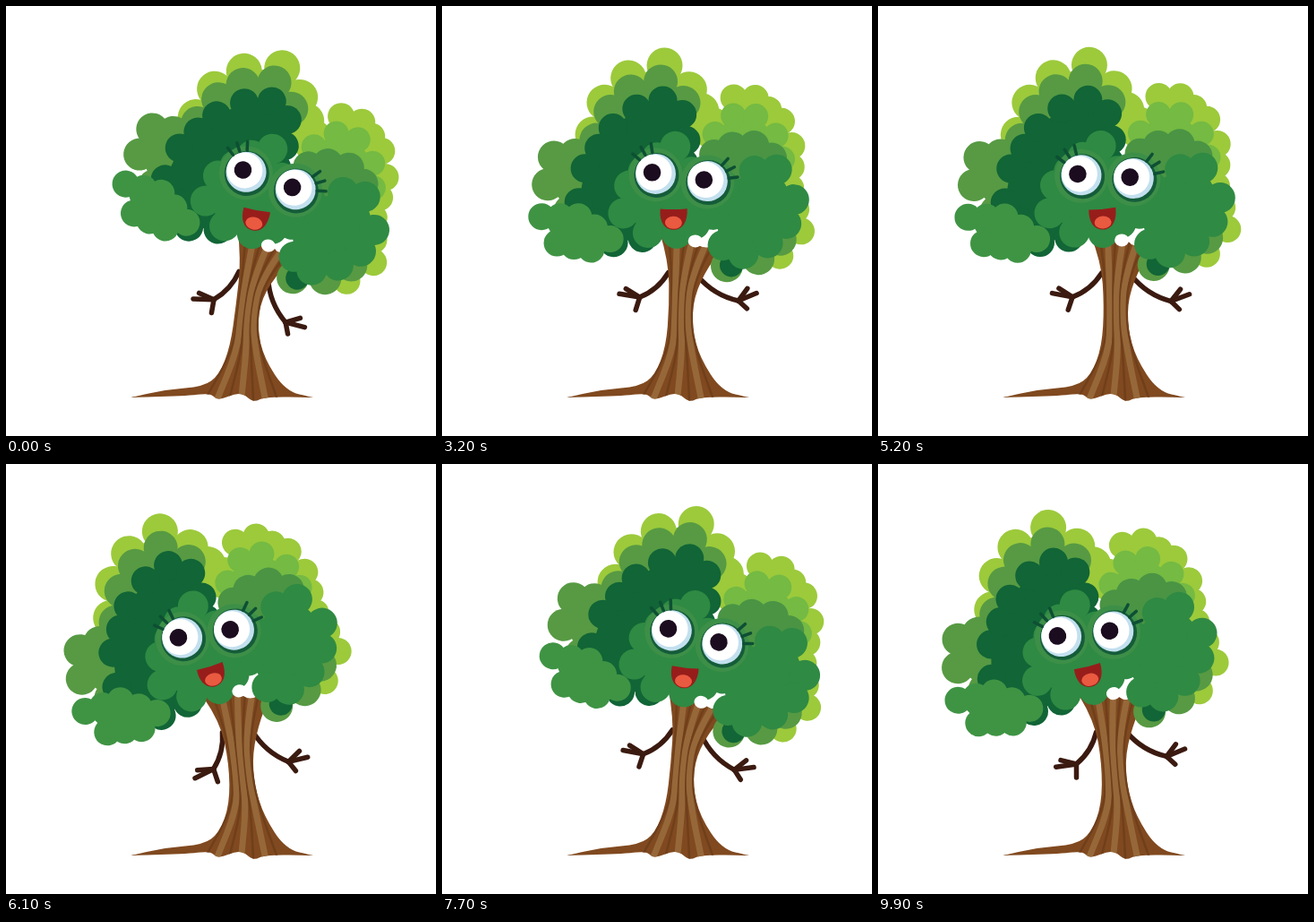
These frames come from a looping animation (480 by 480 pixels, 10000 ms). An HTML page with a canvas:

```html
<!DOCTYPE html>
<html lang="en">
<head>
<meta charset="utf-8">
<title>Swaying tree</title>
<style>
html, body { margin: 0; width: 100%; height: 100%; overflow: hidden; background: #fff; }
canvas { display: block; }
</style>
</head>
<body>
<canvas id="stage" width="480" height="480"></canvas>
<script>
const c = document.getElementById('stage').getContext('2d');
const RAD = Math.PI / 180;
// Times in seconds when the sway turns round, starting at the far right
const TURNS = [0.2, 2.15, 4.05, 6.15, 8.3, 10.35];

function circle(x, y, r, fill) {
  c.fillStyle = fill;
  c.beginPath();
  c.arc(x, y, r, 0, 7);
  c.fill();
}

function ellipse(x, y, rx, ry, fill) {
  c.fillStyle = fill;
  c.beginPath();
  c.ellipse(x, y, rx, ry, 0, 0, 7);
  c.fill();
}

function line(color, width, from, to, via = from) {
  c.strokeStyle = color;
  c.lineWidth = width;
  c.beginPath();
  c.moveTo(...from);
  c.quadraticCurveTo(...via, ...to);
  c.stroke();
}

// Point at a distance from [x, y] in a direction given in degrees
const polar = ([x, y], deg, len) => [x + len * Math.cos(deg * RAD), y + len * Math.sin(deg * RAD)];

// A filled shape with round lobes spaced evenly along its edge
function clump(color, r, ...corners) {
  c.fillStyle = color;
  c.beginPath();
  corners.forEach(p => c.lineTo(...p));
  c.fill();
  corners.forEach(([x, y], i) => {
    const [nx, ny] = corners[(i + 1) % corners.length];
    const steps = Math.max(1, Math.round(Math.hypot(nx - x, ny - y) / (1.7 * r)));
    for (let k = 0; k < steps; k++)
      circle(x + (nx - x) * k / steps, y + (ny - y) * k / steps, r, color);
  });
}

function leaves() {
  const lime = '#9cca3b', olive = '#579a43', dark = '#116536', leaf = '#2f8a43';
  clump(lime, 20, [164,146], [176,110], [202,82], [242,67], [270,93], [298,140]);
  clump(lime, 15, [300,128], [320,101], [344,101], [374,126], [386,153], [386,200],
    [399,248], [376,276], [330,200]);
  clump('#74ba43', 14, [300,142], [320,121], [345,121], [368,142], [376,168], [305,180]);
  clump(olive, 19, [183,120], [205,97], [238,85], [264,108], [260,150], [168,152]);
  clump(olive, 18, [121,172], [115,203], [140,232], [172,235], [168,166]);
  clump(olive, 18, [317,289], [352,280], [376,258], [340,250]);
  clump(dark, 16, [212,116], [241,106], [263,121], [268,150], [264,200], [222,260],
    [190,266], [150,222], [156,184], [186,138]);
  circle(322, 288, 13, dark);
  clump('#4a9444', 17, [300,165], [320,156], [344,154], [364,167], [350,200], [300,195]);
  clump(leaf, 17, [236,170], [256,157], [275,185], [312,200], [345,182], [370,180],
    [390,213], [382,240], [362,262], [335,275], [312,266], [300,232], [260,254],
    [228,254], [200,233], [206,202]);
  clump('#3f9444', 15, [109,239], [127,268], [165,274], [186,262], [150,238]);
}

function eye(x, y, lashAngle) {
  circle(x, y + 1, 30, '#3d8f48');
  circle(x + 1, y + 1.5, 25, '#155c3a');
  circle(x, y, 22.5, '#c3e0ef');
  circle(x - 2, y - 1.5, 20, '#fff');
  circle(x - 4, y - 1.5, 9.8, '#1b0c1f');
  for (let i = 0; i < 3; i++) {
    const deg = lashAngle + 20 * i;
    line('#0e4f34', 3.5, polar([x, y], deg, 24), polar([x, y], deg, 34));
  }
}

function face() {
  eye(235, 188, -140);
  eye(293, 195, -49);
  c.save();
  c.beginPath();
  c.moveTo(241, 227);
  c.quadraticCurveTo(256, 228, 271, 226);
  c.bezierCurveTo(272, 241, 266, 250, 256, 250);
  c.bezierCurveTo(246, 250, 240, 241, 241, 227);
  c.fillStyle = '#971d1b';
  c.fill();
  c.clip();
  ellipse(256, 242, 9.5, 7, '#ea5a40');
  c.restore();
}

// The higher a point of the trunk, the more it follows the sway
function bend([x, y], sway) {
  const k = sway * (Math.max(0, 400 - y) / 140) ** 2;
  return [x + 18 * k, y + 0.28 * k * (x - 262)];
}

function smooth(points, sway) {
  const p = points.map(q => bend(q, sway));
  c.beginPath();
  c.moveTo(...p[0]);
  for (let i = 1; i < p.length - 1; i++) {
    const [x, y] = p[i], [nx, ny] = p[i + 1];
    c.quadraticCurveTo(x, y, (x + nx) / 2, (y + ny) / 2);
  }
  c.lineTo(...p[p.length - 1]);
}

function trunk(sway) {
  smooth([[240,254], [251,285], [253,335], [250,380], [238,412], [220,425], [180,428],
    [139,437], [139,437], [205,435], [229,432], [236,441], [262,430], [276,443],
    [289,436], [343,437], [343,437], [312,430], [288,393], [279,360], [280,325],
    [296,288], [312,270], [312,262], [286,272], [274,250]], sway);
  c.fillStyle = '#80491f';
  c.fill();
  c.save();
  c.clip();
  // Wood grain: strands that spread towards the crown and the roots
  for (let i = 0; i < 7; i++) {
    const f = (i + 0.5) / 7, light = i % 2;
    smooth([[246 + 62 * f, 258], [253 + 30 * f, 300], [254 + 25 * f, 350],
      [250 + 36 * f, 385], [215 + 95 * f, 440]], sway);
    c.strokeStyle = light ? '#966839' : '#6f3f1b';
    c.lineWidth = light ? 7 : 2.5;
    c.stroke();
  }
  c.restore();
}

// bow is the sideways curve of the arm; fingers are [turn, length]
function arm(shoulder, angle, length, bow, fingers) {
  const color = '#3b1a10';
  const wrist = polar(shoulder, angle, length);
  const mid = polar(polar(shoulder, angle, length / 2), angle + 90, bow);
  line(color, 5.5, shoulder, wrist, mid);
  for (const [turn, len] of fingers) line(color, 5.5, wrist, polar(wrist, angle + turn, len));
}

// Draws a part of the head, turned about the point between the eyes
function turned(sway, deg, paint) {
  c.save();
  c.translate(261 + 36 * sway, 191 + 2.7 * sway + 1.5 * sway * sway);
  c.rotate(deg * RAD);
  c.translate(-263.5, -191.5);
  paint();
  c.restore();
}

function phaseAt(t) {
  let i = 0;
  while (t >= TURNS[i + 1]) i++;
  return Math.PI * (i + (t - TURNS[i]) / (TURNS[i + 1] - TURNS[i]));
}

function draw(t) {
  const phase = phaseAt(t);
  const sway = Math.cos(phase);
  const lag = phase - 12 * RAD;
  const wave = (base, a, b) => base + a * Math.cos(lag) + b * Math.cos(2 * lag);
  c.fillStyle = '#fff';
  c.fillRect(0, 0, 480, 480);
  c.lineCap = c.lineJoin = 'round';
  arm(bend([251, 298], sway), wave(127, 13, -13), 42, -7, [[50, 23], [72, 18], [-32, 15]]);
  arm(bend([284, 301], sway), wave(46, 18, 14), 53, 9, [[-85, 17], [-54, 22], [11, 13]]);
  trunk(sway);
  turned(sway, 1 + 16.5 * Math.cos(phase - 8 * RAD), () => {
    leaves();
    ellipse(281, 262, 8, 7, '#fff'); // gap in the fork
  });
  turned(sway, 14.5 * sway - 1.2, face);
}

const start = performance.now();
function tick() {
  const ms = (performance.now() - start) % 10000;
  draw(Math.floor(ms / 100) / 10);
  requestAnimationFrame(tick);
}
tick();
</script>
</body>
</html>
```
